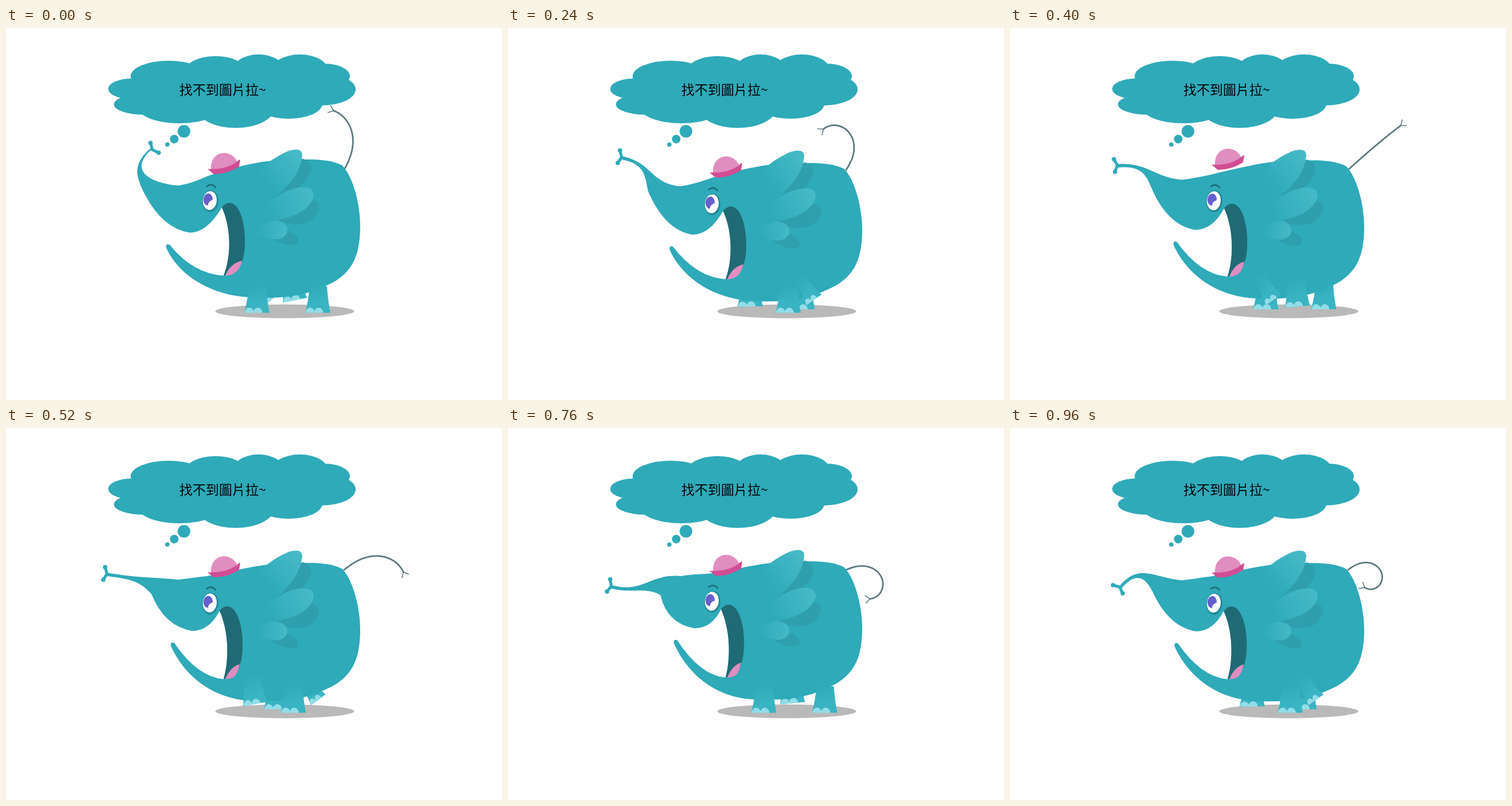
Recreate the animation shown at these times as an HTML page with a canvas. Size 864 by 648 pixels, loop 1000 ms.

```html
<!DOCTYPE html>
<html lang="zh-Hant">
<head>
<meta charset="utf-8">
<style>
html, body { margin: 0; width: 100%; height: 100%; overflow: hidden; background: #fff; }
canvas { display: block; }
</style>
</head>
<body>
<canvas id="stage" width="864" height="648"></canvas>
<script>
const ctx = document.getElementById('stage').getContext('2d');
const TEAL = '#2eaab9', LIGHT = '#45b9c7', SHADE = '#2f9fae', DARK = '#1f6b75';
const LOOP = 1000, STEP = 40, STRIDE = 720;
const { PI, sin, cos } = Math, TAU = 2 * PI, DEG = PI / 180;

// Time, trunk tip x, y and angle, tail heading and curl
const SWING = [
  [0, 255, 212, 140, 62, 100],
  [240, 198, 225, 10, 58, 165],
  [400, 187, 239, -5, 42, -5],
  [520, 176, 254, 8, 38, -105],
  [680, 181, 264, 32, 22, -170],
  [840, 180, 285, -12, 25, -230],
  [960, 191, 277, -50, 36, -255]
];

// Smooth curve through the keys
function swing(t) {
  const last = SWING.length - 1;
  const i = Math.min(last - 1, SWING.findLastIndex(k => k[0] <= t));
  const a = SWING[i], b = SWING[i + 1], span = b[0] - a[0], u = (t - a[0]) / span;
  const slope = (k, c) => {
    const p = SWING[Math.max(0, k - 1)], n = SWING[Math.min(last, k + 1)];
    return (n[c] - p[c]) / (n[0] - p[0]) * span;
  };
  return a.map((v, c) => {
    const d = b[c] - v, m = slope(i, c), n = slope(i + 1, c);
    return v + u * (m + u * (3 * d - 2 * m - n + u * (m + n - 2 * d)));
  });
}

function fill(shape, color) {
  ctx.fillStyle = color;
  ctx.fill(typeof shape === 'string' ? new Path2D(shape) : shape);
}

function stroke(shape, color, width) {
  ctx.strokeStyle = color;
  ctx.lineWidth = width;
  ctx.stroke(typeof shape === 'string' ? new Path2D(shape) : shape);
}

function oval(x, y, rx, ry, color, turn = 0) {
  ctx.beginPath();
  ctx.ellipse(x, y, rx, ry, turn, 0, TAU);
  ctx.fillStyle = color;
  ctx.fill();
}

function ramp(x0, y0, x1, y1, from, to) {
  const g = ctx.createLinearGradient(x0, y0, x1, y1);
  g.addColorStop(0, from);
  g.addColorStop(1, to);
  return g;
}

function at(x, y, draw) {
  ctx.save();
  ctx.translate(x, y);
  draw();
  ctx.restore();
}

function cloud() {
  const lobe = (x, y, rx, ry) => oval(x, y, rx, ry, TEAL);
  lobe(283, 84, 66, 27);
  lobe(365, 76, 54, 27);
  lobe(440, 74, 45, 28);
  lobe(512, 74, 49, 28);
  lobe(555, 84, 44, 22);
  lobe(550, 107, 59, 28);
  lobe(220, 106, 42, 18);
  lobe(240, 133, 52, 18);
  lobe(302, 136, 74, 30);
  lobe(400, 140, 67, 34);
  lobe(492, 132, 59, 26);
  lobe(390, 108, 180, 44);
  for (let i = 0; i < 3; i++) {
    const r = 11 - 3.6 * i;
    lobe(310 - 19.5 * i + 2.5 * i * i, 180 + 15.5 * i - 2 * i * i, r, r);
  }
  ctx.fillStyle = '#000';
  ctx.font = '500 23px "Noto Sans CJK TC", "Noto Sans CJK", sans-serif';
  ctx.fillText('找不到圖片拉~', 302, 116);
}

// One walking leg: the foot slides back on the ground, then swings forward
function leg(x, ground, phase) {
  const q = (phase + 80) % STRIDE - 80, u = Math.max(0, (q - 250) / 390);
  const tilt = -40 * DEG * sin(PI * Math.sqrt(u)) ** 2;
  const shift = u ? 53 - 35 * (1 - cos(PI * u)) : 0.213 * q;
  const w = 44 * cos(tilt) ** 1.5;
  at(x + shift, ground - 14 * sin(PI * u), () => {
    ctx.rotate(tilt);
    fill(`M0 0Q6-22 8-46H${w - 6}Q${w - 4}-20 ${w} 0Z`, ramp(0, -46, 8, -12, TEAL, '#39b4c2'));
    for (const c of [0.2, 0.54]) {
      ctx.beginPath();
      ctx.ellipse(w * c, 0, w * 0.18, 9, 0, PI, 0);
      ctx.fillStyle = '#92dde7';
      ctx.fill();
    }
  });
}

function tail(heading, curl) {
  const line = new Path2D(), n = 40, step = 120 / n;
  let x = 589, y = 247, a;
  line.moveTo(x, y);
  for (let i = 0; i < n; i++) {
    a = (heading + curl * (i / n) ** 1.5) * DEG;
    line.lineTo(x += step * cos(a), y -= step * sin(a));
  }
  stroke(line, '#5b7a7e', 2.8);
  for (const turn of [-0.7, 0.7]) {
    stroke(`M${x} ${y}l${10 * cos(a + turn)} ${-10 * sin(a + turn)}`, '#5b7a7e', 1.6);
  }
}

// Adds the trunk outline, tapering to the tip, and returns its fork
function trunk(path, rootY, tipX, tipY, angle) {
  const dx = -cos(angle * DEG), dy = -sin(angle * DEG);
  const xs = [300, 248, tipX - 55 * dx, tipX], ys = [rootY, rootY - 5, tipY - 55 * dy, tipY];
  const mix = (p, u) => {
    const v = 1 - u;
    return v * v * v * p[0] + 3 * v * v * u * p[1] + 3 * v * u * u * p[2] + u * u * u * p[3];
  };
  path.bezierCurveTo(xs[1], ys[1], xs[2], ys[2], tipX, tipY - 2);
  for (let u = 1; u > 0.34; u -= 0.05) {
    const x = mix(xs, u), y = mix(ys, u);
    const tx = x - mix(xs, u - 0.01), ty = y - mix(ys, u - 0.01);
    const width = (4 + 90 * (1 - u) ** 3) / Math.hypot(tx, ty);
    path.lineTo(x + ty * width, y - tx * width);
  }
  const end = side => [tipX + 5 * dx + side * 11 * dy, tipY + 5 * dy - side * 11 * dx];
  return [end(-1), end(1)];
}

function body(lift, tipX, tipY, angle) {
  const mx = -5 * lift, chinX = 320 + 5 * lift, chinY = 357 - 11 * lift;
  const jawX = 281 + 10 * lift, jawY = 378 - 11 * lift, rootY = 275 - 20 * lift;
  const p = new Path2D();
  p.moveTo(jawX - 2, jawY + 5);
  p.bezierCurveTo(jawX + 19, jawY + 52, 355, 467, 430, 470);
  p.quadraticCurveTo(505, 474, 552, 452);
  p.bezierCurveTo(602, 432, 617, 400, 617, 345);
  p.bezierCurveTo(617, 310, 606, 262, 586, 240);
  p.bezierCurveTo(560, 226, 520, 229, 460, 232);
  p.bezierCurveTo(430, 235, 385, 246, 350, 259 - 8 * lift);
  p.quadraticCurveTo(322, rootY - 3, 300, rootY);
  const ends = trunk(p, rootY, tipX, tipY, angle);
  p.quadraticCurveTo(chinX - 48, chinY - 8, chinX, chinY);
  p.quadraticCurveTo(chinX + 30, chinY, 376 + mx, 313);
  p.bezierCurveTo(391 + mx, 345, 394 + mx, 395, 379, 432);
  p.quadraticCurveTo(jawX + 44, 428, jawX + 4, jawY);
  p.quadraticCurveTo(jawX - 3, jawY - 3, jawX - 2, jawY + 5);
  fill(p, TEAL);

  for (const [x, y] of ends) {
    stroke(`M${tipX} ${tipY}L${x} ${y}`, TEAL, 5);
    oval(x, y, 3.8, 3.8, TEAL);
  }

  const inner = `M379 432C${394 + mx} 395 ${391 + mx} 345 ${376 + mx} 313`;
  fill(`${inner}Q${382 + mx} 305 ${390 + mx} 305C${410 + mx} 307 ${418 + mx} 350 ${416 + mx} 380Q${415 + mx} 426 379 432Z`, DARK);
  fill(`M382 432Q391 410 ${411 + mx} 406Q${408 + mx} 422 397 428Q390 432 382 432Z`, '#e08dbf');
}

function ear(dy) {
  at(0, dy, () => {
    fill('M516 228Q534 232 531 250Q520 283 470 296Z', SHADE);
    fill('M530 300Q551 303 543 322Q530 350 485 340L468 330Z', SHADE);
    fill('M488 352Q512 362 508 374Q497 386 462 366Z', SHADE);
  });
  at(0, dy * 0.3, () => {
    fill('M430 262Q452 232 490 215Q516 206 516 222Q512 262 468 294Z', ramp(452, 270, 508, 222, TEAL, LIGHT));
    fill('M452 310Q478 284 510 278Q538 275 536 294Q526 326 468 335Z', ramp(455, 325, 530, 288, TEAL, LIGHT));
    fill('M438 346Q455 338 468 335Q492 338 490 356Q482 372 460 367Q445 362 436 356Z', ramp(438, 350, 490, 354, TEAL, LIGHT));
  });
}

function eye() {
  oval(356, 302, 14, 19, '#23899a', 0.1);
  oval(355, 301, 12, 16.5, '#fff', 0.1);
  oval(352, 299, 8, 10.5, '#6560cc', 0.1);
  fill('M352 311Q351 303 360 300L363 309Z', '#fff');
  stroke('M350 276Q358 270 365 278', DARK, 2.6);
}

function hat() {
  fill('M357 249C354 210 398 210 404 238L390 250Z', '#e08dbf');
  fill('M351 246Q387 248 406 230L408 230L406 242Q386 255 362 255Z', '#d14d94');
}

function draw(t) {
  const [, tipX, tipY, angle, heading, curl] = swing(t);
  const turn = TAU * t / STRIDE;
  const dy = 3.5 + 4.5 * cos(2 * turn - 150 * DEG) + 2.5 * sin(turn);
  const hop = 9 * Math.max(0, cos(turn - 200 * DEG)) ** 6;
  const lift = sin(PI * t / 1450) ** 2;

  ctx.fillStyle = '#fff';
  ctx.fillRect(0, 0, 864, 648);
  ctx.lineCap = ctx.lineJoin = 'round';
  cloud();
  oval(485.5, 493.5, 121, 12, '#b9b9b9');
  tail(heading, curl);
  leg(483, 490, t + 515);
  leg(415, 490, t + 360);
  at(0, dy, () => body(lift, tipX, tipY - dy, angle));
  leg(415, 496, t);
  leg(488, 496, t + 155);
  ear(dy);
  at(0, dy - 2 * lift, eye);
  at(0, dy - hop, hat);
}

function frame() {
  draw(Math.floor(performance.now() % LOOP / STEP) * STEP);
  requestAnimationFrame(frame);
}
frame();
</script>
</body>
</html>
```
